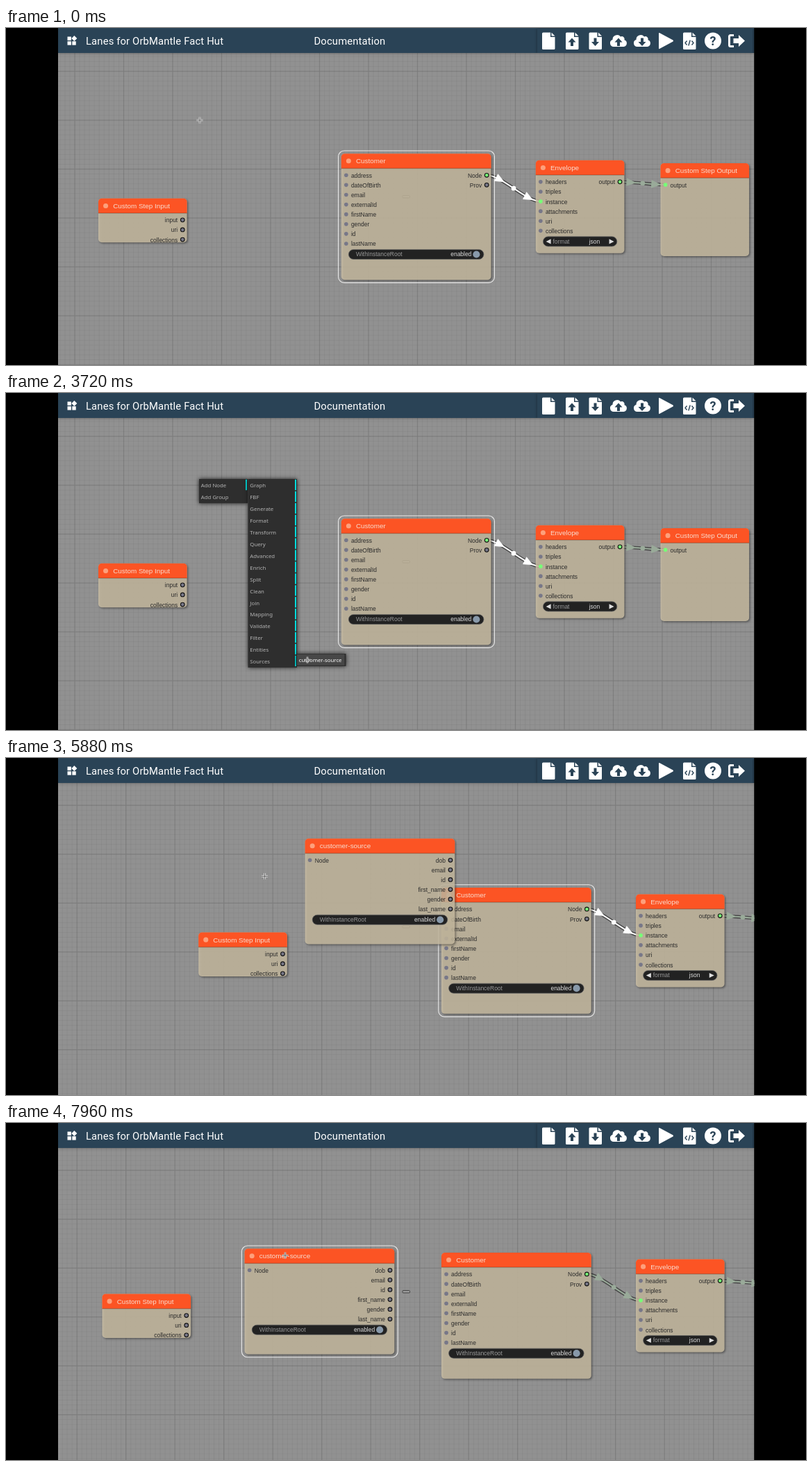
An HTML page with a canvas for the animation above (8000 ms loop, 1152 by 486 pixels).

```html
<!DOCTYPE html>
<html lang="en">
<head>
<meta charset="utf-8">
<title>Node editor</title>
<style>
html, body { margin: 0; width: 100%; height: 100%; overflow: hidden; background: #000; }
canvas { display: block; }
</style>
</head>
<body>
<canvas id="stage" width="1152" height="486"></canvas>
<script>
const ctx = document.getElementById('stage').getContext('2d');
const LOOP = 8000, STEP = 40, SCALE = 0.705;
const LEFT = 75, RIGHT = 1077.5, HEADER = 36;
const SANS = '"Liberation Sans", Arial, sans-serif';
const BAR = '#2a4356';

// Tracks: [time, x, y]
const panKeys = [[4840, 0, 0], [4960, 14, 2], [5080, 42, 4], [5280, 96.5, 6.3], [5480, 130, 6.2], [5720, 144.2, 5.7]];
const inputKeys = [[6160, 0, 0], [6240, -20, -1], [6440, -119, -4.2], [6560, -138.7, -5]];
const sourceKeys = [[7160, 0, 0], [7280, -8, 5], [7400, -24.7, 16], [7600, -58.5, 35], [7800, -79, 54], [7960, -87, 65]];
const cursorKeys = [
  [80, 279, 133], [320, 285, 131], [520, 285, 131], [920, 294, 133], [1680, 294, 133],
  [1920, 352, 140], [2200, 364, 250], [2520, 362, 384], [2560, 362, 384], [2680, 365, 383],
  [3280, 365, 383], [3640, 434, 385], [4240, 434, 385], [4800, 229.5, 178]
];
const grabKeys = [[5720, 373.7, 183.7], [5960, 372, 164], [6160, 335, 262]];
const reachKeys = [[6560, 196.5, 257], [6800, 196.5, 257], [7120, 489, 126]];

const nodes = {
  input: { title: 'Custom Step Input', x: 133, y: 267, w: 181, h: 60, outs: ['input', 'uri', 'collections'] },
  customer: {
    title: 'Customer', x: 482.8, y: 202.4, w: 306, h: 228,
    ins: ['address', 'dateOfBirth', 'email', 'externalId', 'firstName', 'gender', 'id', 'lastName'],
    outs: ['Node', 'Prov'], toggle: 166, linkedOut: 0
  },
  envelope: {
    title: 'Envelope', x: 762.8, y: 212, w: 181, h: 160,
    ins: ['headers', 'triples', 'instance', 'attachments', 'uri', 'collections'],
    outs: ['output'], combo: 126, linkedIn: 2, linkedOut: 0
  },
  output: { title: 'Custom Step Output', x: 942.5, y: 216.2, w: 181, h: 160, ins: ['output'], linkedIn: 0 },
  source: {
    title: 'customer-source', x: 286.4, y: 131.7, w: 306, h: 186,
    ins: ['Node'], outs: ['dob', 'email', 'id', 'first_name', 'gender', 'last_name'], toggle: 126
  }
};

const categories = ['Graph', 'FBF', 'Generate', 'Format', 'Transform', 'Query', 'Advanced', 'Enrich', 'Split',
  'Clean', 'Join', 'Mapping', 'Validate', 'Filter', 'Entities', 'Sources'];

function track(t, keys) {
  if (t <= keys[0][0]) return keys[0].slice(1);
  for (let i = 1; i < keys.length; i++) {
    const [t1, x1, y1] = keys[i], [t0, x0, y0] = keys[i - 1];
    if (t <= t1) {
      const k = (t - t0) / (t1 - t0);
      return [x0 + (x1 - x0) * k, y0 + (y1 - y0) * k];
    }
  }
  return keys[keys.length - 1].slice(1);
}

function text(str, x, y, font, color, align = 'left') {
  ctx.font = font;
  ctx.fillStyle = color;
  ctx.textAlign = align;
  ctx.fillText(str, x, y);
}

function rounded(x, y, w, h, r) {
  ctx.beginPath();
  ctx.roundRect(x, y, w, h, r);
}

function disc(x, y, r, color) {
  ctx.beginPath();
  ctx.arc(x, y, r, 0, Math.PI * 2);
  ctx.fillStyle = color;
  ctx.fill();
}

function shadow(color, blur, offset = 0) {
  ctx.shadowColor = color;
  ctx.shadowBlur = blur;
  ctx.shadowOffsetX = ctx.shadowOffsetY = offset;
}

function drawGridLines(step, alpha, width, panX, panY) {
  const start = (offset, min) => min + ((offset - min) % step + step) % step;
  ctx.beginPath();
  for (let x = start(99 + panX, LEFT); x < RIGHT; x += step) { ctx.moveTo(x, HEADER); ctx.lineTo(x, 486); }
  for (let y = start(62.5 + panY, HEADER); y < 486; y += step) { ctx.moveTo(LEFT, y); ctx.lineTo(RIGHT, y); }
  ctx.lineWidth = width;
  ctx.strokeStyle = `rgba(0,0,0,${alpha})`;
  ctx.stroke();
}

function drawBackground([panX, panY]) {
  ctx.fillStyle = '#919191';
  ctx.fillRect(LEFT, HEADER, RIGHT - LEFT, 450);
  drawGridLines(7.05, 0.055, 0.8, panX, panY);
  drawGridLines(70.5, 0.09, 1.4, panX, panY);
  rounded(571, 241.5, 10.5, 3.5, 1);
  ctx.fillStyle = '#999';
  ctx.fill();
  ctx.lineWidth = 1;
  ctx.strokeStyle = '#444';
  ctx.stroke();
}

function drawPill(y, w) {
  rounded(15, y, w - 30, 20, 10);
  ctx.fillStyle = '#222';
  ctx.fill();
  ctx.lineWidth = 1;
  ctx.strokeStyle = '#666';
  ctx.stroke();
}

function triangle(points, color) {
  ctx.beginPath();
  points.forEach(([x, y]) => ctx.lineTo(x, y));
  ctx.fillStyle = color;
  ctx.fill();
}

function drawNode(node, [x, y], selected) {
  const { w, h, ins = [], outs = [] } = node, small = '12px ' + SANS;
  ctx.save();
  ctx.translate(x, y);
  ctx.scale(SCALE, SCALE);

  shadow('rgba(0,0,0,.5)', 3, 1.5);
  rounded(0, -30, w, h + 30, 7);
  ctx.fillStyle = 'rgba(208,196,168,.8)';
  ctx.fill();
  shadow('transparent', 0);
  rounded(0, -30, w, 30, [7, 7, 0, 0]);
  ctx.fillStyle = '#fc5424';
  ctx.fill();
  ctx.fillStyle = 'rgba(0,0,0,.2)';
  ctx.fillRect(0, -1, w, 2);
  disc(15, -15, 5, '#fda07c');
  text(node.title, 30, -10, '14px ' + SANS, '#f8dccf');

  if (selected) {
    rounded(-6, -36, w + 13, h + 42, 12);
    ctx.lineWidth = 1.6;
    ctx.strokeStyle = 'rgba(255,255,255,.8)';
    ctx.stroke();
  }
  ins.forEach((name, i) => {
    disc(10, 14 + i * 20, 4, i === node.linkedIn ? '#7f7' : '#778');
    text(name, 20, 19 + i * 20, small, '#2b2b2b');
  });
  outs.forEach((name, i) => {
    disc(w - 9, 14 + i * 20, 4, i === node.linkedOut ? '#7f7' : '#778');
    ctx.lineWidth = 1.6;
    ctx.strokeStyle = '#111';
    ctx.stroke();
    text(name, w - 19, 19 + i * 20, small, '#2b2b2b', 'right');
  });
  if (node.toggle) {
    const top = node.toggle;
    drawPill(top, w);
    text('WithInstanceRoot', 30, top + 14, small, '#999');
    text('enabled', w - 40, top + 14, small, '#ddd', 'right');
    disc(w - 30, top + 10, 7.2, '#89a');
  }
  if (node.combo) {
    const top = node.combo;
    drawPill(top, w);
    triangle([[31, top + 5], [21, top + 10], [31, top + 15]], '#ddd');
    triangle([[w - 31, top + 5], [w - 21, top + 10], [w - 31, top + 15]], '#ddd');
    text('format', 35, top + 14, small, '#999');
    text('json', w - 50, top + 14, small, '#ddd', 'right');
  }
  ctx.restore();
}

function drawLink([fromNode, fromPos], [toNode, toPos], color) {
  const ax = fromPos[0] + (fromNode.w - 9) * SCALE, ay = fromPos[1] + (14 + fromNode.linkedOut * 20) * SCALE;
  const bx = toPos[0] + 10 * SCALE, by = toPos[1] + (14 + toNode.linkedIn * 20) * SCALE;
  const bend = Math.hypot(bx - ax, by - ay) / 4;
  const point = k => {
    const m = 1 - k, p = m * m * m, q = 3 * m * m * k, r = 3 * m * k * k, s = k * k * k;
    return [p * ax + q * (ax + bend) + r * (bx - bend) + s * bx, (p + q) * ay + (r + s) * by];
  };
  ctx.beginPath();
  ctx.moveTo(ax, ay);
  ctx.bezierCurveTo(ax + bend, ay, bx - bend, by, bx, by);
  for (const [width, style] of [[4.9, 'rgba(0,0,0,.5)'], [2.1, color]]) {
    ctx.lineWidth = width;
    ctx.strokeStyle = style;
    ctx.stroke();
  }
  for (const k of [0.25, 0.75]) {
    const [x, y] = point(k), [x2, y2] = point(k + 0.01);
    ctx.save();
    ctx.translate(x, y);
    ctx.rotate(Math.atan2(y2 - y, x2 - x));
    triangle([[-5.5, -6], [8.5, 0], [-5.5, 6]], color);
    ctx.restore();
  }
  disc(...point(0.5), 3.4, color);
}

function drawMenu(x, y, w, items, hovered, hasSub) {
  const row = 16.93;
  shadow('rgba(0,0,0,.8)', 6);
  ctx.fillStyle = '#2e2e2e';
  ctx.fillRect(x, y, w, items.length * row + 1);
  shadow('transparent', 0);
  items.forEach((item, i) => {
    const top = y + 0.8 + i * row, hot = i === hovered;
    if (hot) {
      ctx.fillStyle = '#474747';
      ctx.fillRect(x, top, w - 2, row - 1);
    }
    if (hasSub(i)) {
      ctx.fillStyle = '#0dd';
      ctx.fillRect(x + w - 3, top, 2, row - 1.6);
    }
    text(item, x + 2.8, top + 11.4, '7.8px "Noto Sans", sans-serif', hot ? '#fff' : '#b4b4b4');
  });
}

function drawMenus(t, [cx, cy]) {
  if (t < 520 || t >= 3800) return;
  const inSource = t >= 2880 && cx > 419;
  const inSub = t >= 1240 && cx > 348 && !inSource;
  const row = Math.floor((cy - 124.5) / 16.93);
  drawMenu(278, 124, 70, ['Add Node', 'Add Group'], inSub || inSource ? -1 : row, i => i === 0);
  if (t >= 1240) drawMenu(348.5, 124, 70.5, categories, inSub ? row : -1, () => true);
  if (t >= 2880) drawMenu(419, 376, 70.5, ['customer-source'], inSource ? 0 : -1, () => false);
}

const handShape = new Path2D('M-1 0Q0-1.2 1 0V3.5L4.5 4.3Q5.4 4.6 5.2 6L4.3 9.5H-1L-3.6 5.6Q-3-4.2-1 5Z'.replace('Q-3-4.2', 'Q-3 4.2'));
const crossShape = new Path2D('M-4.5 0H4.5M0-4.5V4.5');

function drawCursor([x, y], hand) {
  ctx.save();
  ctx.translate(x, y);
  if (hand) {
    ctx.lineWidth = 1.4;
    ctx.strokeStyle = '#111';
    ctx.stroke(handShape);
    ctx.fillStyle = '#fff';
    ctx.fill(handShape);
  } else {
    ctx.lineWidth = 2.6;
    ctx.strokeStyle = 'rgba(240,240,240,.9)';
    ctx.stroke(crossShape);
    ctx.lineWidth = 0.9;
    ctx.strokeStyle = '#555';
    ctx.stroke(crossShape);
  }
  ctx.restore();
}

const file = 'M-7.5-12H3V-5.5H9.5V11Q9.5 12.5 8 12.5H-7.5Q-9 12.5-9 11V-10.5Q-9-12-7.5-12ZM4.5-12L9.5-7H4.5Z';
const cloud = 'M-7 8.5A5.3 5.3 0 0 1-8.5-1.8A6.5 6.5 0 0 1 3-6A4 4 0 0 1 8.5-1.2A5 5 0 0 1 7.5 8.5Z';
const up = 'M0-4L5.5 2H2V7.5H-2V2H-5.5Z', down = 'M0 7.5L5.5 1.5H2V-4H-2V1.5H-5.5Z';
const icons = [
  { x: 781, fill: file },
  { x: 815, fill: file, cut: up },
  { x: 848.5, fill: file, cut: down },
  { x: 882, fill: cloud, cut: up },
  { x: 916, fill: cloud, cut: down },
  { x: 950, fill: 'M-9-11.5Q-10-12-10-10.5V10.5Q-10 12-9 11.5L10.5 1Q11.5 0 10.5-1Z' },
  { x: 984, fill: file, cutLine: 'M-3.5 0L-6 3L-3.5 6M3.5 0L6 3L3.5 6M1.2-1L-1.2 7' },
  { x: 1018, fill: 'M-12 0A12 12 0 0 1 12 0A12 12 0 0 1-12 0Z', mark: '?' },
  { x: 1052, fill: 'M3-8.5L12 0L3 8.5V3.5H-4.5V-3.5H3Z', line: 'M-4-8H-8.5Q-10.5-8-10.5-6V6Q-10.5 8-8.5 8H-4' }
];
const paint = (method, path, color) => {
  if (!path) return;
  ctx[method + 'Style'] = color;
  ctx[method](new Path2D(path));
};

function drawHeader() {
  shadow('rgba(0,0,0,.4)', 4);
  ctx.fillStyle = BAR;
  ctx.fillRect(LEFT, 0, RIGHT - LEFT, HEADER);
  ctx.save();
  ctx.beginPath();
  ctx.rect(LEFT, 0, RIGHT - LEFT, HEADER);
  ctx.clip();
  ctx.fillRect(765, 1, 310, HEADER);
  ctx.restore();
  shadow('transparent', 0);

  ctx.fillStyle = '#fff';
  for (const [x, y] of [[88.5, 12.5], [88.5, 19.2], [95.3, 19.2]]) ctx.fillRect(x, y, 5.4, 5.4);
  triangle([[98.3, 11], [102.3, 15], [98.3, 19], [94.3, 15]], '#fff');
  ctx.letterSpacing = '0.148px';
  text('Lanes for OrbMantle Fact Hut', 115, 23.6, '14.8px Roboto, sans-serif', '#fff');
  text('Documentation', 443.5, 23.6, '14.8px Roboto, sans-serif', '#fff');
  ctx.letterSpacing = '0px';

  for (const icon of icons) {
    ctx.save();
    ctx.translate(icon.x, 18.5);
    paint('fill', icon.fill, '#fff');
    paint('fill', icon.cut, BAR);
    ctx.lineWidth = 1.4;
    paint('stroke', icon.cutLine, BAR);
    ctx.lineWidth = 3;
    paint('stroke', icon.line, '#fff');
    if (icon.mark) text(icon.mark, 0, 6.5, 'bold 18px Roboto, sans-serif', BAR, 'center');
    ctx.restore();
  }
}

function cursorAt(t, pan, inputMove, sourceMove) {
  if (t >= 7160) return [489 + sourceMove[0], 126 + sourceMove[1]];
  if (t >= 6560) return track(t, reachKeys);
  if (t >= 6160) return [335.2 + inputMove[0], 262 + inputMove[1]];
  if (t >= 5720) return track(t, grabKeys);
  const [x, y] = track(t, cursorKeys);
  return [x + pan[0], y + pan[1]];
}

function draw(t) {
  const pan = track(t, panKeys);
  const inputMove = track(t, inputKeys), sourceMove = track(t, sourceKeys);
  const place = (node, [dx, dy] = [0, 0]) => [node.x + pan[0] + dx, node.y + pan[1] + dy];
  const selected = t < 6160 ? 'customer' : t < 7160 ? 'input' : 'source';
  const positions = {
    input: place(nodes.input, inputMove),
    customer: place(nodes.customer),
    envelope: place(nodes.envelope),
    output: place(nodes.output)
  };
  if (t >= 3800) positions.source = place(nodes.source, sourceMove);
  const end = name => [nodes[name], positions[name]];

  ctx.fillStyle = '#000';
  ctx.fillRect(0, 0, 1152, 486);
  ctx.save();
  ctx.beginPath();
  ctx.rect(LEFT, 0, RIGHT - LEFT, 486);
  ctx.clip();
  drawBackground(pan);
  drawLink(end('customer'), end('envelope'), selected === 'customer' ? '#fff' : '#9a9');
  drawLink(end('envelope'), end('output'), '#9a9');
  for (const name in positions) drawNode(nodes[name], positions[name], name === selected);
  drawHeader();
  const cursor = cursorAt(t, pan, inputMove, sourceMove);
  drawMenus(t, cursor);
  drawCursor(cursor, t >= 520 && t < 3560);
  ctx.restore();
}

const origin = performance.now();
function tick() {
  const t = (performance.now() - origin) % LOOP;
  draw(Math.floor(t / STEP) * STEP);
  requestAnimationFrame(tick);
}
tick();
</script>
</body>
</html>
```
